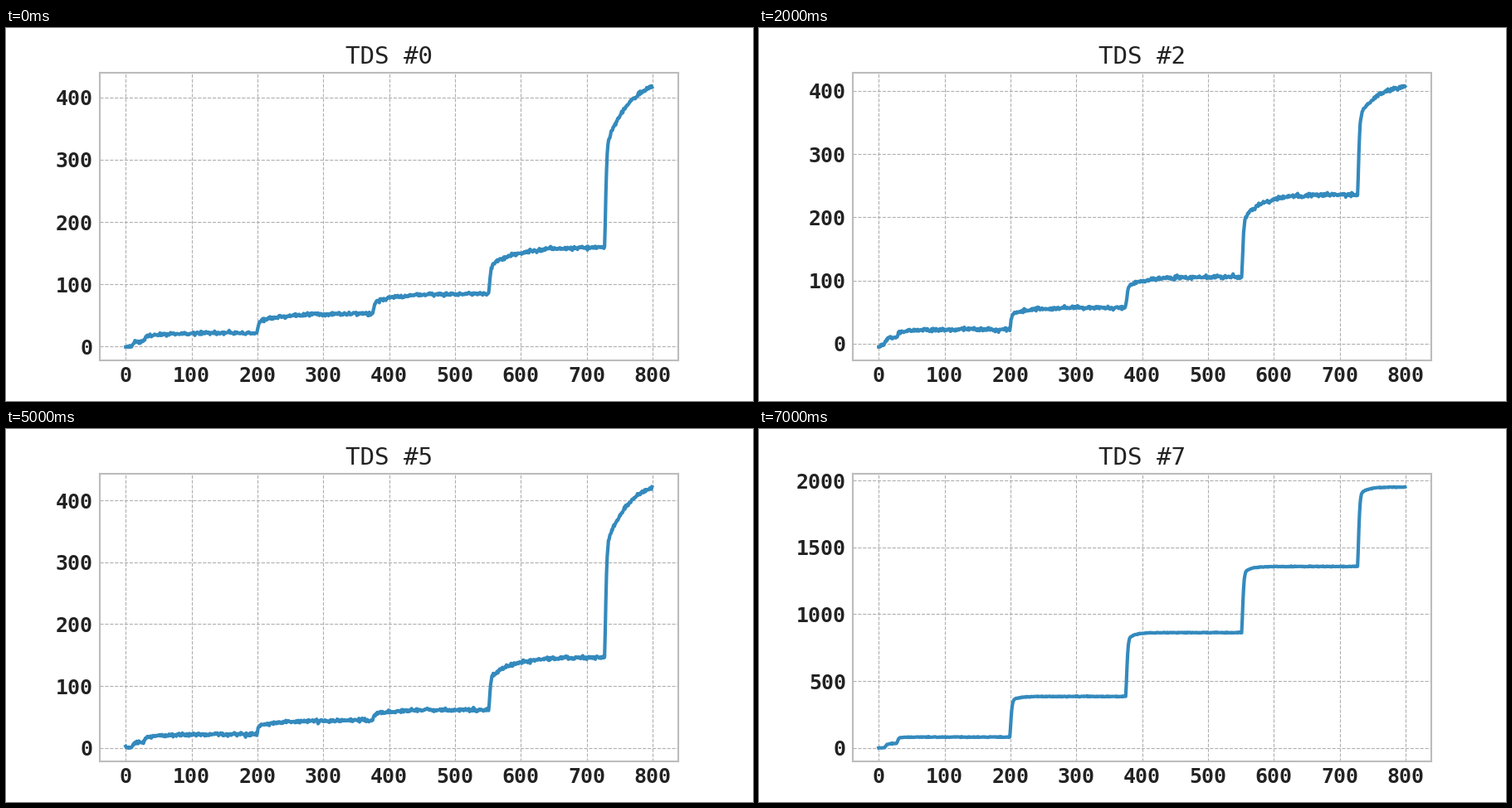
These frames come from a looping animation (900x450 px, 8 s). A matplotlib script:

```python
import numpy as np
import matplotlib.pyplot as plt
from matplotlib.animation import FuncAnimation

plt.rcParams["font.family"] = "DejaVu Sans Mono"

INK = "#222222"
COUNT = 800
EDGES = [9, 27, *range(199, 728, 176)]  # sample where each rise begins
x = np.arange(COUNT)


def settle(t, fast):
    """Steep share `fast` of a rise, then a slow exponential approach."""
    slow = 90 * (1 - fast)
    return fast * (1 - np.exp(-(t / 2.5) ** 1.5)) + (1 - fast) * (1 - np.exp(-t / slow))


def staircase(low, high, fast, levels, noise=1.35):
    """Noisy steps that end each plateau at the next level, kept in low..high."""
    y = low * np.clip(1 - x / EDGES[0], 0, 1)
    stops = EDGES[1:] + [COUNT]
    for edge, stop, level in zip(EDGES, stops, [0.4 * levels[0], *levels]):
        shape = settle(x[edge:] - edge, fast)
        y[edge:] = y[edge] + (level - y[edge]) * shape / shape[stop - edge - 1]
    rng = np.random.default_rng(int(high))
    return low, high, np.clip(y + rng.normal(0, noise, COUNT), low, high)


channels = [
    staircase(-0.4, 418.4, 0.57, [22, 53, 85, 159, 417.5]),
    staircase(-30.5, 1309.2, 0.85, [85, 270, 575, 820, 1140], noise=52),
    staircase(-5.3, 408.2, 0.68, [22.5, 57, 105.5, 236, 407]),
    staircase(-0.4, 689, 0.70, [19, 40.5, 88, 341, 687.5]),
    staircase(-0.4, 1250, 0.85, [60, 245, 500, 850, 1248]),
    staircase(-0.2, 422.3, 0.60, [22, 44.5, 61.5, 146.5, 421]),
    staircase(-4, 416, 0.65, [22, 51, 83, 188, 415]),
    staircase(-1, 1953.5, 0.88, [80, 384, 862, 1357, 1951]),
]

fig, ax = plt.subplots(figsize=(9, 4.5), dpi=100, facecolor="white")
fig.subplots_adjust(left=0.125, right=0.9, bottom=0.11, top=0.88)
for spine in ax.spines.values():
    spine.set(color="#bcbcbc", linewidth=1.5)
ax.grid(color="#b0b0b0", linestyle="--", linewidth=0.8)
ax.set_axisbelow(True)
ax.tick_params(length=0, pad=5.5, labelsize=18, labelcolor=INK)
ax.set_xlim(-39.95, 838.95)
ax.set_xticks(range(0, 801, 100))
title = ax.set_title("", fontsize=21, color=INK, pad=8)
line, = ax.plot([], [], color="#348abd", linewidth=3)


def draw(index):
    low, high, y = channels[index]
    margin = 0.05 * (high - low)
    ax.set_ylim(low - margin, high + margin)
    line.set_data(x, y)
    title.set_text(f"TDS #{index}")
    for label in ax.get_xticklabels() + ax.get_yticklabels():
        label.set_fontweight("bold")
    return line, title


anim = FuncAnimation(fig, draw, frames=len(channels), interval=1000,
                     repeat=True, repeat_delay=0, blit=False)
plt.show()
```
